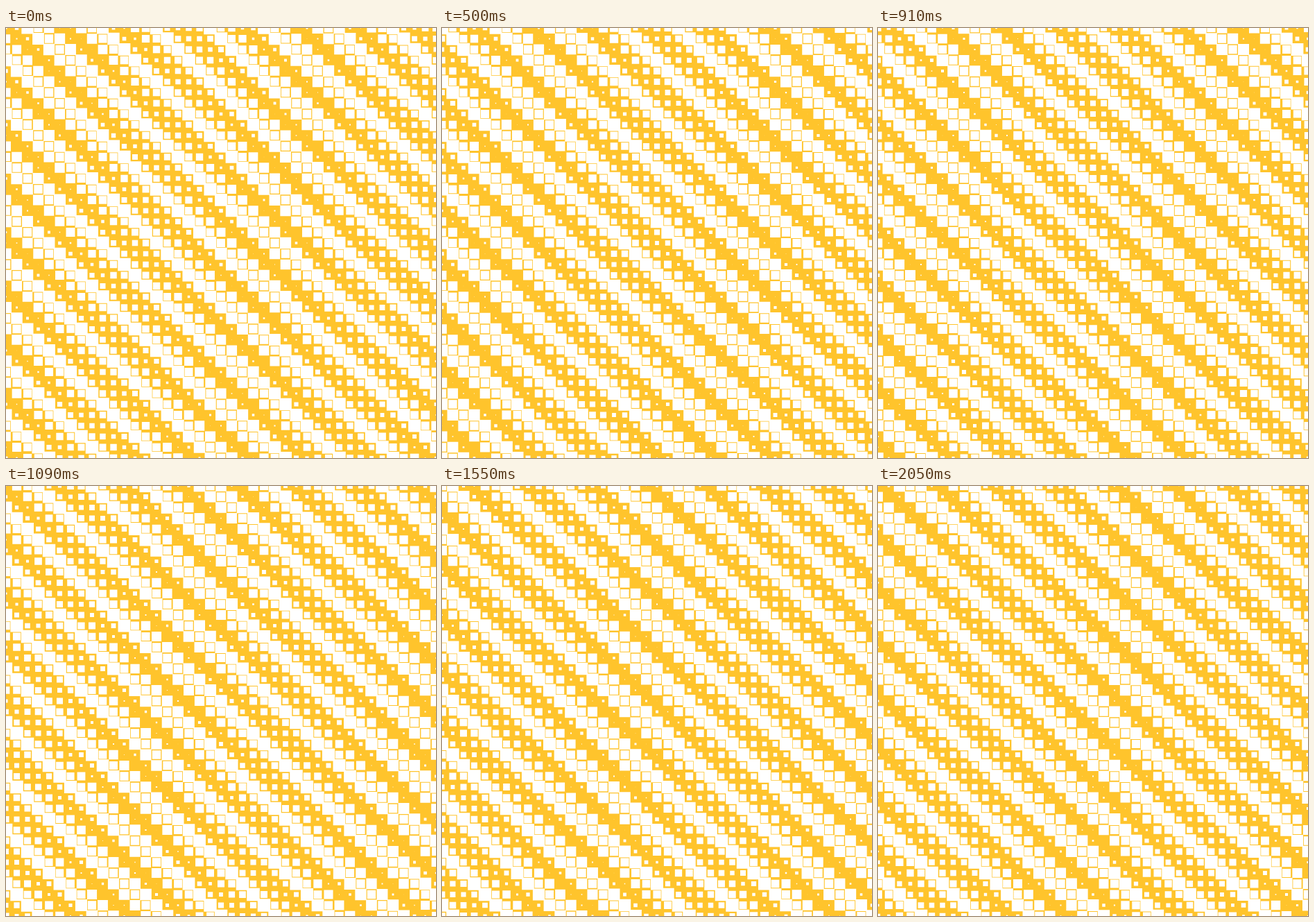
Recreate the animation shown at these times as an HTML page. Size 620 by 620 pixels, loop 2.1 s.

```html
<!DOCTYPE html>
<html lang="en">
<head>
<meta charset="utf-8">
<title>Square wave field</title>
<style>
  html, body { margin: 0; width: 100%; height: 100%; overflow: hidden; background: #ffc42c; }
  svg { display: block; width: 620px; height: 620px; }
</style>
</head>
<body>
<svg viewBox="0 0 620 620">
  <rect width="620" height="620" fill="#ffc42c"/>
  <path id="squares" fill="#fff"/>
</svg>
<script>
const LOOP = 2100, STEPS = 46, STEP_MS = 45.5;
const CELLS = 40, CELL = 620 / CELLS;
const squares = document.getElementById('squares');

// The side swings through zero; the largest squares overlap their neighbours.
function sideAt(col, row, phase) {
  return CELL * Math.abs(0.2 + Math.sin(10 * col + 2.5 * row + phase));
}

function square(cx, cy, side) {
  const x = (cx - side / 2).toFixed(2), y = (cy - side / 2).toFixed(2), s = side.toFixed(2);
  return `M${x} ${y}h${s}v${s}h-${s}z`;
}

function draw(ms) {
  const step = Math.min(STEPS - 1, Math.floor((ms % LOOP + 5) / STEP_MS));
  const phase = 2 * Math.PI * step / STEPS;
  let d = '';
  for (let row = 0; row <= CELLS; row++) {
    for (let col = 0; col <= CELLS; col++) {
      d += square(col * CELL, row * CELL, sideAt(col, row, phase));
    }
  }
  squares.setAttribute('d', d);
}

const start = performance.now();
function tick() {
  draw(performance.now() - start);
  requestAnimationFrame(tick);
}
tick();
</script>
</body>
</html>
```
